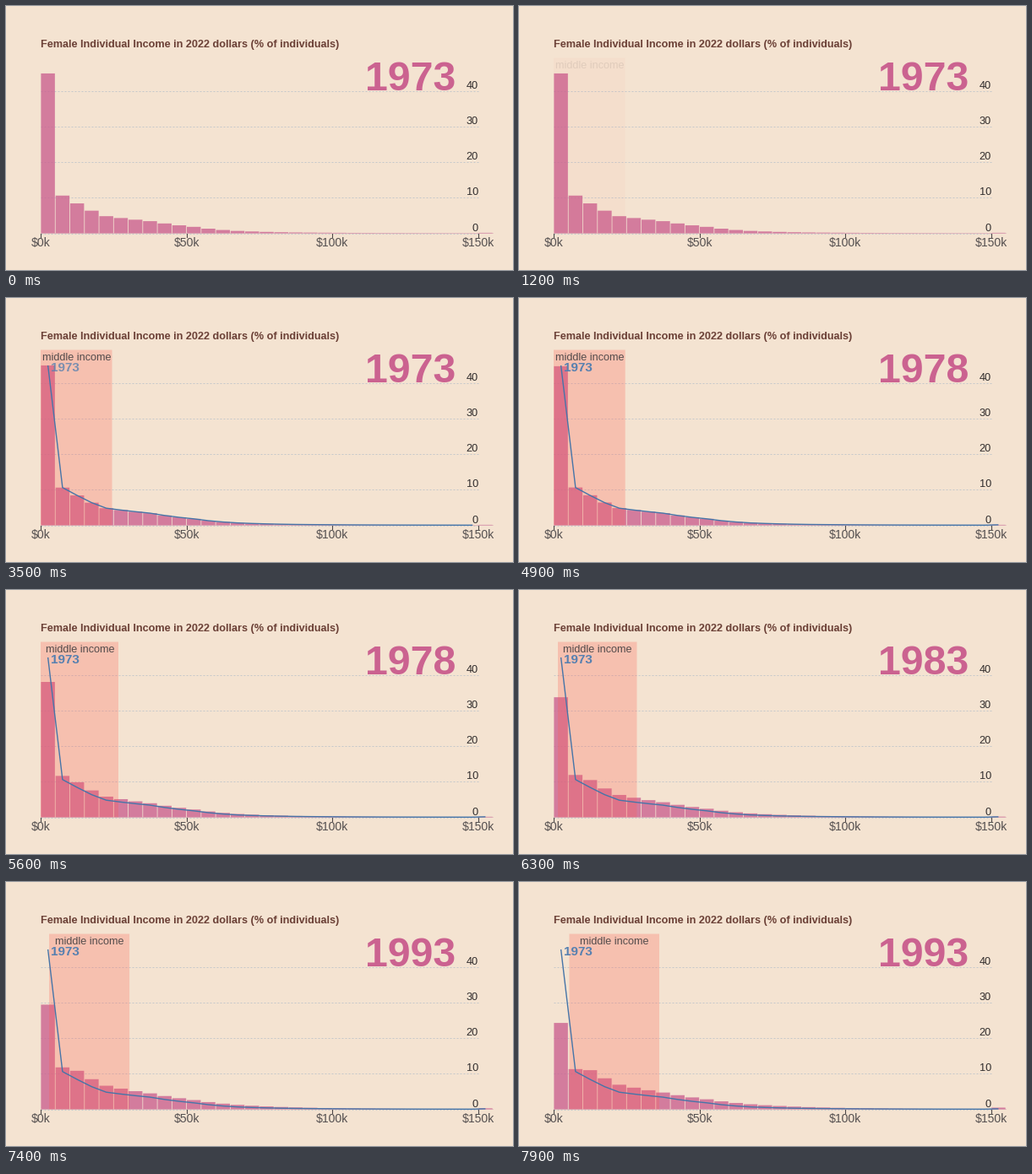
Write a matplotlib script that moves like this. It is 600 by 313 pixels and loops after 8000 ms.

```python
import numpy as np
import matplotlib.pyplot as plt
from matplotlib.animation import FuncAnimation
from matplotlib.patches import Rectangle

W, H, DPI = 600, 313, 100
FRAMES, STEP = 80, 100
PT = 72 / DPI
X0, BASE, BIN, UNIT = 41, 269.4, 17.26, 4.21
BINS, TOP = 31, 61.5
FIRST, HOLD, TWEEN, LAST = 4800, 850, 500, 4

BG, PINK, BLUE, BROWN = "#f4e3d1", "#cb6290", "#4675a8", "#6b4036"

plt.rcParams["font.family"] = ["Liberation Sans", "DejaVu Sans"]


def ease(t, start, length):
    u = np.clip((t - start) / length, 0, 1)
    return 4 * u ** 3 if u < .5 else 1 - 4 * (1 - u) ** 3


def along(pos, *keys):
    """Value at a position on the five-year steps, from keys at 0, 1, 3 and 4."""
    return np.interp(pos, [0, 1, 3, 4], keys)


def decay(*levels):
    """Falling curve through a few bins, straight on a log scale."""
    return np.exp(np.interp(np.arange(BINS), [1, 2, 4, 7, 10, 13, 17, 29],
                            np.log(levels)))


EARLY = decay(10.6, 8.4, 4.8, 3.4, 1.8, .65, .22, .02)
LATE = decay(11.3, 11, 6.9, 4.7, 2.8, 1.4, .6, .05)
BUMP = 1.3 * np.exp(-np.arange(BINS) / 3)


def shares(pos):
    u = along(pos, 0, 1 / 3, .75, 1)
    vals = EARLY + (LATE - EARLY) * u + BUMP * np.sin(np.pi * u)
    vals[0] = 45 - 20.7 * u
    vals[-1] = .12 + .33 * u ** 3
    return vals


fig = plt.figure(figsize=(W / DPI, H / DPI), dpi=DPI, facecolor=BG)
ax = fig.add_axes([0, 0, 1, 1])
ax.set_xlim(0, W)
ax.set_ylim(H, 0)
ax.axis("off")


def label(x, y, s, px, color, ha="left", weight="normal"):
    return ax.text(x, y, s, fontsize=px * PT, color=color, ha=ha,
                   va="baseline", weight=weight, zorder=6)


def box(x, y, w, h, color, alpha, z):
    return ax.add_patch(Rectangle((x, y), w, h, fc=color, lw=0, alpha=alpha,
                                  zorder=z, snap=False))


# Axes
for v in range(0, 50, 10):
    y = 269.5 - v * UNIT
    ax.plot([X0, 559], [y, y], color="#c5c8cb", lw=PT, dashes=(2, 2), zorder=1)
    label(559, y - 2.9, str(v), 12.7, "#302c2c", "right")
for k in range(0, 200, 50):
    x = X0 + k / 5 * BIN
    ax.plot([x, x], [269.5, 273.5], color="#4d4848", lw=1.1 * PT, zorder=2)
    label(x, 285.3, f"${k}k", 14, "#555050", "center")
ax.plot([X0, X0 + BINS * BIN], [BASE, BASE], color="#e0b9be", lw=.8 * PT, zorder=2)

label(41, 48.5, "Female Individual Income in 2022 dollars (% of individuals)",
      12.63, BROWN, weight="bold")
year = label(424.6, 100.1, "1973", 48.3, PINK, weight="bold")

bars = [box(X0 + i * BIN + .4, BASE, BIN - .8, 0, PINK, .8, 3) for i in range(BINS)]
band = box(X0, TOP, 0, BASE - TOP, "#ff5c50", 0, 4)
band_text = label(83, 74, "middle income", 12.64, "#544c4c", "center")

# Outline of the first year, revealed by arc length
px = X0 + (np.arange(BINS) + .5) * BIN
py = BASE - shares(0) * UNIT
arc = np.concatenate([[0], np.cumsum(np.hypot(np.diff(px), np.diff(py)))])
trace, = ax.plot([], [], color=BLUE, lw=1.4 * PT, zorder=5,
                 solid_capstyle="butt", solid_joinstyle="round")
trace_text = label(53, 87, "1973", 15.3, "#5680b0", weight="bold")


def draw(frame):
    t = frame * STEP
    step = int(np.clip((t - FIRST) // HOLD + 1, 0, LAST))
    pos = sum(ease(t, FIRST + i * HOLD, TWEEN) for i in range(LAST))

    year.set_text(str(1973 + 5 * step))
    for bar, v in zip(bars, shares(pos)):
        bar.set_y(BASE - v * UNIT)
        bar.set_height(v * UNIT)

    left = along(pos, 41, 41, 51, 59.5)
    right = along(pos, 125.5, 133, 146, 166)
    shown = ease(t, 950, 800)
    band.set_x(left)
    band.set_width(right - left)
    band.set_alpha(.26 * shown)
    band_text.set_x((left + right) / 2 + .4)
    band_text.set_alpha(shown)

    reach = arc[-1] * ease(t, 1860, 2000)
    n = np.searchsorted(arc, reach)
    trace.set_data(np.append(px[:n], np.interp(reach, arc, px)),
                   np.append(py[:n], np.interp(reach, arc, py)))
    trace.set_visible(reach > 0)
    trace_text.set_alpha(ease(t, 3100, 650))
    return [year, *bars, band, band_text, trace, trace_text]


anim = FuncAnimation(fig, draw, frames=FRAMES, interval=STEP,
                     repeat=True, repeat_delay=0, blit=False)
plt.show()
```
